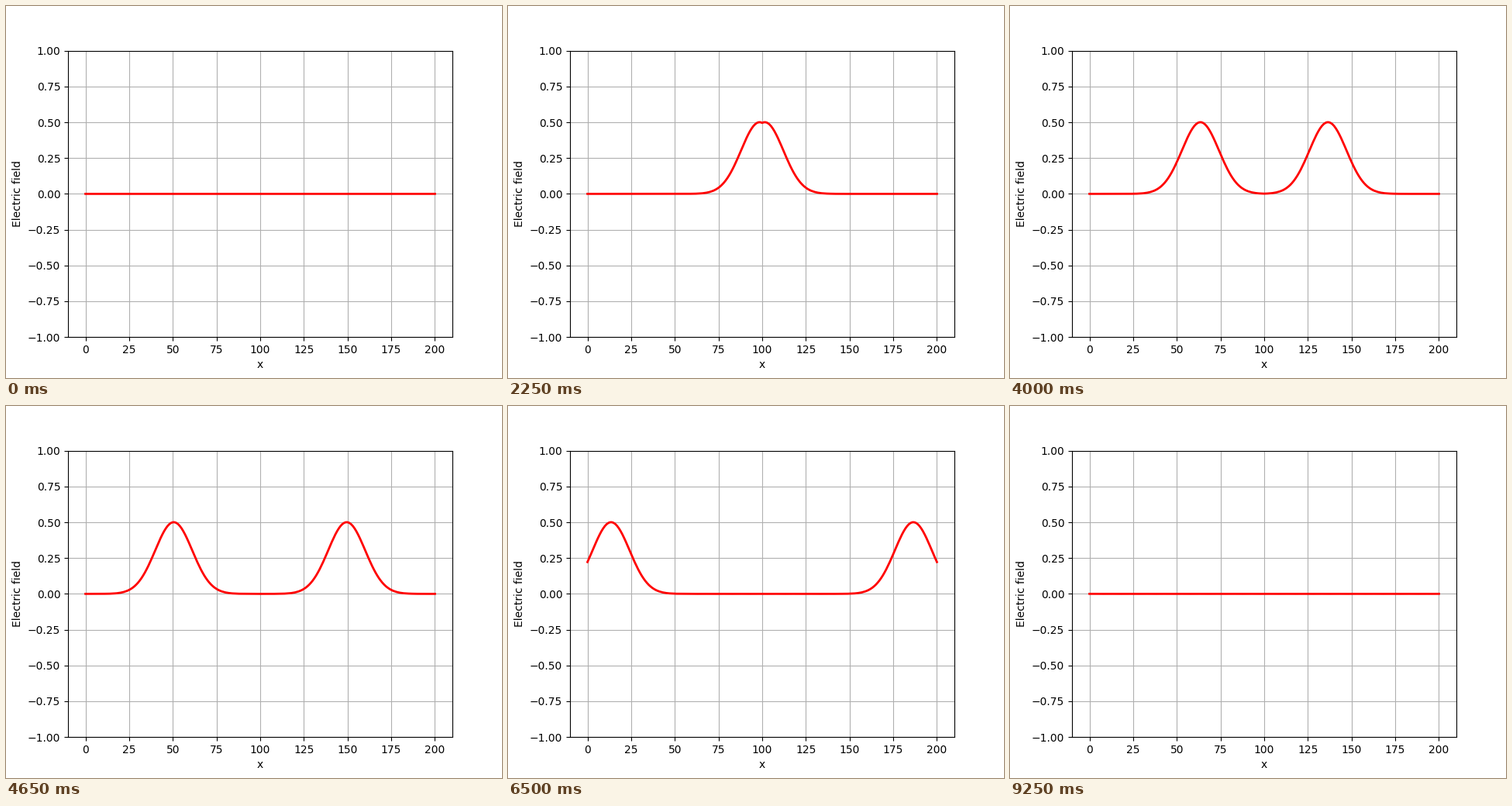
A matplotlib script for the animation above (9950 ms loop, 640 px wide and 480 px high).

```python
import matplotlib.pyplot as plt
import numpy as np
from matplotlib.animation import FuncAnimation

CELLS = 201
STEPS = 199
SOURCE = 100
DELAY, SPREAD = 45, 15


def simulate():
    """1D FDTD at the magic time step, Gaussian soft source, absorbing ends."""
    e = np.zeros(CELLS)
    h = np.zeros(CELLS - 1)
    history = []
    for t in range(1, STEPS + 1):
        h += e[1:] - e[:-1]
        left, right = e[1], e[-2]
        e[1:-1] += h[1:] - h[:-1]
        e[0], e[-1] = left, right
        e[SOURCE] += np.exp(-((t - DELAY) / SPREAD) ** 2)
        history.append(e.copy())
    return history


fields = simulate()

fig, ax = plt.subplots(figsize=(6.4, 4.8), dpi=100)
line, = ax.plot(np.arange(CELLS), fields[0], color="red", lw=2)
ax.set_xlim(-10, 210)
ax.set_ylim(-1, 1)
ax.set_xlabel("x")
ax.set_ylabel("Electric field")
ax.grid(True)


def update(frame):
    line.set_ydata(fields[frame])
    return line,


anim = FuncAnimation(fig, update, frames=STEPS, interval=50,
                     repeat=True, repeat_delay=0)
plt.show()
```
